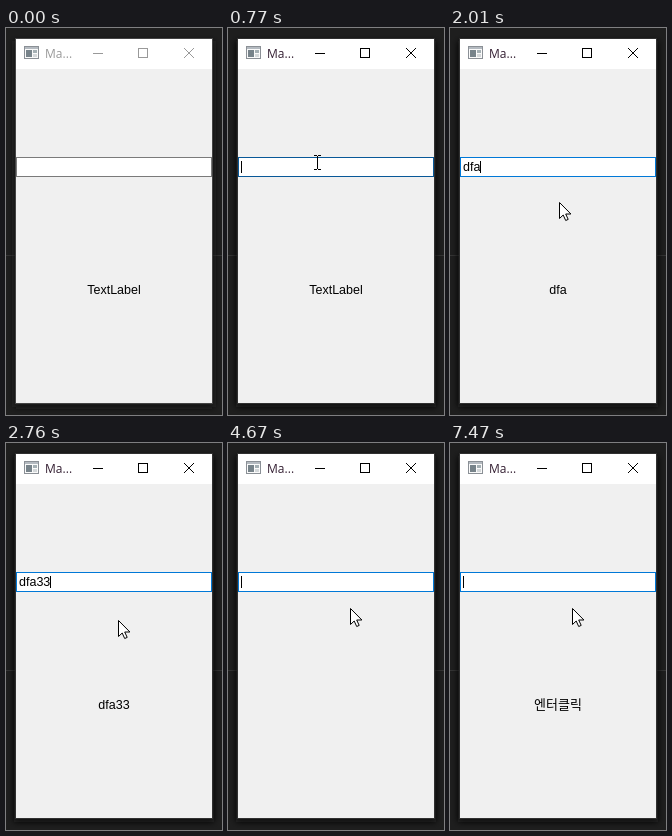
An HTML page for the animation above (8000 ms loop, 216x387 px).

```html
<!DOCTYPE html>
<html lang="en">
<head>
<meta charset="utf-8">
<title>Line edit demo</title>
<style>
  html, body { margin: 0; width: 100%; height: 100%; overflow: hidden; background: #1e1e1e; }
  svg { display: block; width: 216px; height: 387px; }
  .ui { font: 12.5px "Liberation Sans", "Noto Sans CJK KR", "Noto Sans CJK", sans-serif; white-space: pre; }
  .hangul { font: 500 13px "Noto Sans CJK KR", "Noto Sans CJK", sans-serif; }
  .title { font: 12px "Open Sans", sans-serif; }
  .crisp { shape-rendering: crispEdges; }
</style>
</head>
<body>
<svg viewBox="0 0 216 387">
  <defs>
    <filter id="blur" x="-10%" y="-10%" width="120%" height="120%"><feGaussianBlur stdDeviation="3"/></filter>
  </defs>
  <rect width="216" height="387" fill="#1e1e1e"/>
  <rect y="227" width="216" height="1" fill="#343434"/>
  <rect id="shadow" x="8" y="13" width="200" height="366" filter="url(#blur)"/>
  <rect id="frame" class="crisp" x="9" y="10" width="198" height="366"/>
  <rect class="crisp" x="10" y="11" width="196" height="30" fill="#fff"/>
  <rect class="crisp" x="10" y="41" width="196" height="334" fill="#f0f0f0"/>

  <g id="icon" class="crisp">
    <rect x="18.5" y="18.5" width="14" height="12" fill="#fafafa" stroke="#8b9096"/>
    <rect x="19" y="19" width="13" height="2" fill="#b4bac0"/>
    <rect x="20" y="22" width="6" height="7" fill="#77838a"/>
    <rect x="27" y="22" width="4" height="3" fill="#a5b0b4"/>
    <rect x="27" y="26" width="4" height="3" fill="#d4d8da"/>
  </g>
  <text id="title" class="title" x="39" y="30">Ma...</text>
  <g id="buttons" fill="none">
    <path class="crisp" d="M87 25.5h10M132.500 20.500h9v9h-9z"/>
    <path d="M178 20l10 10M188 20l-10 10"/>
  </g>

  <rect id="border" class="crisp" x="10.5" y="129.500" width="195" height="19" fill="#fff"/>
  <rect id="selection" class="crisp" x="13" y="133" height="12" fill="#0078d7"/>
  <text id="edit" class="ui" x="13" y="143"></text>
  <rect id="caret" class="crisp" y="133" width="1" height="12"/>
  <text id="label" x="108" y="266" text-anchor="middle"></text>

  <path id="arrow" d="M.5.5v16l3.700-3.500 2.500 5.500 2.500-1.100-2.500-5.400h5.200z" fill="#fff" stroke="#000"/>
  <path id="beam" class="crisp" d="M-3 -6.500h3M1 -6.500h3M.5 -6v13M-3 7.500h3M1 7.500h3" fill="none" stroke="#000"/>
</svg>
<script>
const LOOP = 8000, CLICK = 630, LEAVE = 1370, CARET_ON = 660;
const GREY = [122, 122, 122], DARK = [23, 23, 23], BLUE = [0, 120, 215];
const $ = id => document.getElementById(id);
const ui = Object.fromEntries([...document.querySelectorAll('[id]')].map(el => [el.id, el]));

// Each state: start time, edit text, label text, whether the edit is selected.
const typed = (time, text) => ({ time, edit: text, label: text });
const typeRun = (start, end, before, added) => [...added].map((_, i) =>
  typed(start + (end - start) * i / (added.length - 1), before + added.slice(0, i + 1)));
const selected = (time, text) => ({ ...typed(time, text), select: true });

const states = [
  { time: 0, edit: '', label: 'TextLabel' },
  { time: CLICK, edit: '', label: 'TextLabel' },
  typed(1680, 'd'), typed(1750, 'df'), typed(2010, 'dfa'),
  typed(2560, 'dfa3'), typed(2720, 'dfa33'), typed(2890, 'dfa33f'),
  ...typeRun(3090, 3720, 'dfa33f', 'adfasd'),
  selected(4140, 'dfa33fadfasd'),
  typed(4670, ''),
  ...typeRun(5070, 5810, '', 'fjalskdf'),
  typed(5880, 'fjalskdfn'),
  selected(6410, 'fjalskdfn'),
  typed(6610, ''),
  { time: 7400, edit: '', label: '엔터클릭' },
];

// Pointer path: time, x, y
const path = [
  [70, 142, 214], [350, 108, 162], [560, 89, 134], [910, 89, 134], [1050, 90, 131],
  [1330, 103, 147], [1470, 109, 174], [2560, 109, 174], [2700, 112, 177],
  [3090, 112, 177], [3720, 123, 164], [3939, 123, 164], [3940, 122, 165],
];

const clamp = v => Math.min(1, Math.max(0, v));
const mix = (a, b, k) => a + (b - a) * k;
const mixColor = (a, b, k) => `rgb(${a.map((v, i) => Math.round(mix(v, b[i], k)))})`;
const show = (el, on) => el.setAttribute('visibility', on ? 'visible' : 'hidden');
const set = (el, attrs) => Object.entries(attrs).forEach(([k, v]) => el.setAttribute(k, v));

function pointerAt(t) {
  const next = path.findIndex(p => p[0] > t);
  if (next < 0) return path.at(-1).slice(1);
  const [a, b] = [path[next - 1], path[next]];
  const k = (t - a[0]) / (b[0] - a[0]);
  return [1, 2].map(i => Math.round(mix(a[i], b[i], k)));
}

function borderAt(t, hover) {
  if (t < CLICK) return mixColor(hover ? DARK : GREY, BLUE, 0);
  return t < LEAVE
    ? mixColor(DARK, BLUE, clamp((t - CLICK) / 210))
    : mixColor(DARK, BLUE, clamp((t - LEAVE) / 270));
}

function drawPointer(t) {
  const visible = t >= 70;
  const [x, y] = visible ? pointerAt(t) : [0, 0];
  const hover = visible && y >= 129 && y < 149;
  for (const el of [ui.arrow, ui.beam]) set(el, { transform: `translate(${x} ${y})` });
  show(ui.arrow, visible && !hover);
  show(ui.beam, hover);
  return hover;
}

function drawWindow(t, hover) {
  const active = t >= CLICK;
  set(ui.shadow, { fill: active ? '#101010' : '#171717' });
  set(ui.frame, { fill: active ? '#303030' : '#444' });
  set(ui.title, { fill: active ? '#352033' : '#999' });
  set(ui.buttons, { stroke: active ? '#000' : '#999' });
  set(ui.border, { stroke: borderAt(t, hover) });
}

function drawText(t) {
  const state = states.findLast(s => s.time <= t);
  ui.edit.textContent = state.edit;
  ui.label.textContent = state.label;
  set(ui.label, { class: /[가-힣]/.test(state.label) ? 'hangul' : 'ui' });
  const width = state.edit ? Math.round(ui.edit.getComputedTextLength()) : 0;
  set(ui.edit, { fill: state.select ? '#fff' : '#000' });
  set(ui.selection, { width });
  show(ui.selection, state.select);
  set(ui.caret, { x: 13 + width });
  show(ui.caret, t >= CLICK && !state.select && t - state.time < CARET_ON);
}

function draw(t) {
  drawWindow(t, drawPointer(t));
  drawText(t);
}

const start = performance.now();
function tick() {
  draw((performance.now() - start) % LOOP);
  requestAnimationFrame(tick);
}
tick();
</script>
</body>
</html>
```
